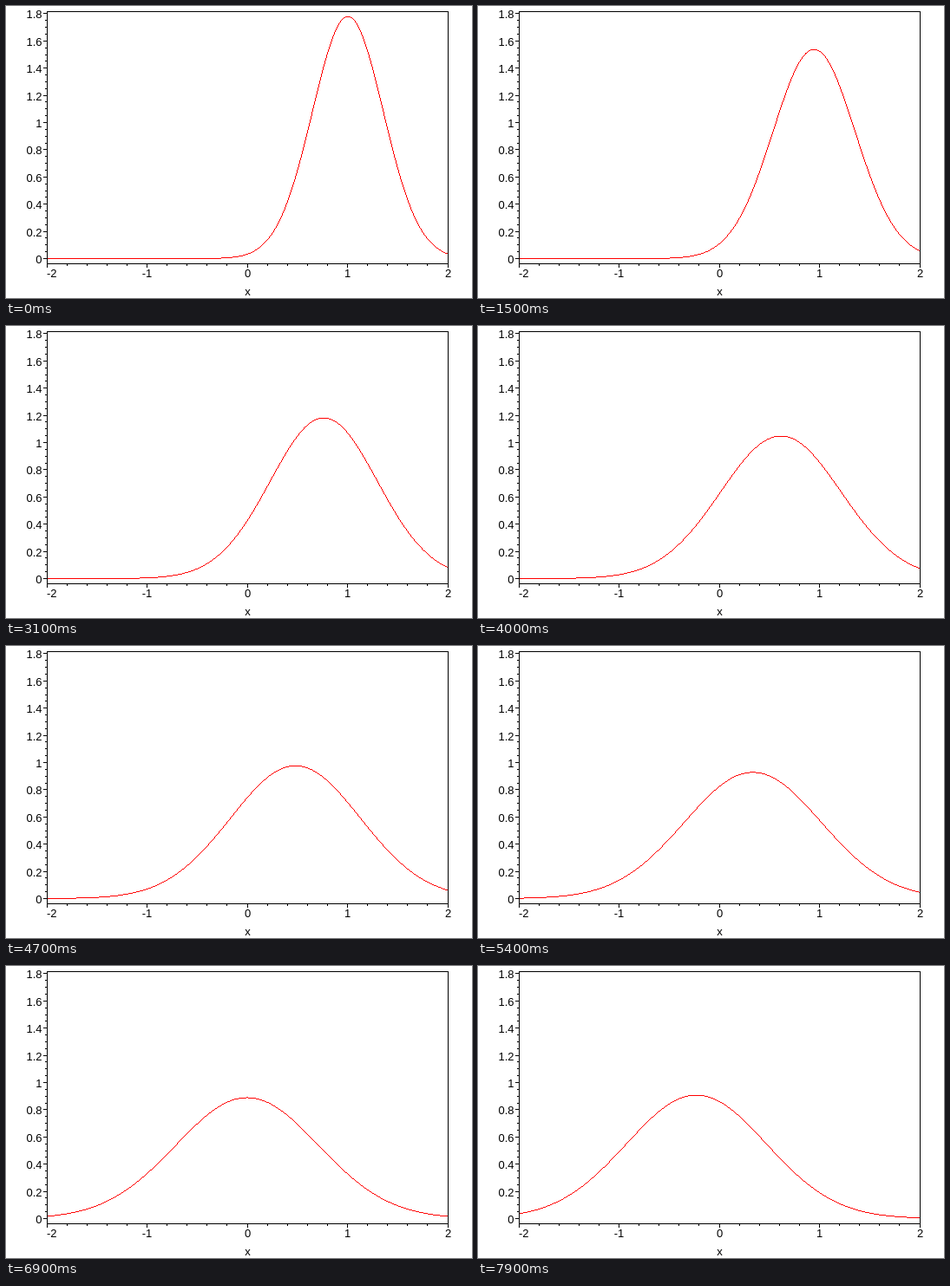
An HTML page that plays this animation: 537 by 337 pixels, repeating every 8 s.

```html
<!DOCTYPE html>
<html lang="en">
<head>
<meta charset="utf-8">
<title>Oscillating wave packet</title>
<style>
  html, body { margin: 0; width: 100%; height: 100%; overflow: hidden; background: #fff; }
  svg { display: block; }
  path { shape-rendering: crispEdges; }
  text { font: 13px "Liberation Sans", Arial, sans-serif; fill: #000; }
</style>
</head>
<body>
<svg id="plot" width="537" height="337" viewBox="0 0 537 337">
  <path id="axes" fill="#000"/>
  <path id="curve" fill="#f00"/>
</svg>
<script>
const LOOP = 8000, STEP = 100, STEPS_PER_PERIOD = 275;
const LEFT = 47, RIGHT = 509, TOP = 6, BOTTOM = 297;
const ZERO_X = 278, UNIT_X = 115.5, ZERO_Y = 291, UNIT_Y = 157, PEAK = 279;

const plot = document.getElementById('plot');
const curve = document.getElementById('curve');
const box = (x, y, w, h) => `M${x} ${y}h${w}v${h}h${-w}z`;

function label(str, x, y, anchor) {
  const el = document.createElementNS('http://www.w3.org/2000/svg', 'text');
  el.textContent = str;
  el.setAttribute('x', x);
  el.setAttribute('y', y);
  el.setAttribute('text-anchor', anchor);
  plot.append(el);
}

function drawAxes() {
  const width = RIGHT - LEFT + 1, height = BOTTOM - TOP + 1;
  let d = box(LEFT, TOP, width, 1) + box(LEFT, BOTTOM, width, 1)
        + box(LEFT, TOP, 1, height) + box(RIGHT, TOP, 1, height);

  for (let i = -10; i <= 10; i++) {
    const x = Math.floor(ZERO_X + i / 5 * UNIT_X), major = i % 5 === 0;
    d += box(x, BOTTOM, 1, major ? 5 : 3);
    if (!major) continue;
    if (i === -10) label('-2', LEFT, 313, 'start');
    else label(String(i / 5), x + 0.5, 313, 'middle');
  }

  for (let i = 0; i <= 36; i++) {
    const y = Math.round(ZERO_Y - i / 20 * UNIT_Y), major = i % 4 === 0;
    const size = major ? 4 : 2;
    d += box(LEFT - size, y, size, 1);
    if (major) label(String(i / 20), 41.5, y + 5.5, 'end');
  }

  label('x', ZERO_X + 0.5, 334, 'middle');
  document.getElementById('axes').setAttribute('d', d);
}

// Gaussian whose centre swings as a cosine while its width breathes.
function drawCurve(step) {
  const angle = 2 * Math.PI * step / STEPS_PER_PERIOD;
  const centre = Math.cos(angle);
  const spread = Math.hypot(centre, 2 * Math.sin(angle));
  const rowAt = px => {
    const u = 2 * ((px - ZERO_X) / UNIT_X - centre) / spread;
    return Math.round(ZERO_Y - PEAK / spread * Math.exp(-u * u));
  };
  let d = '';
  for (let x = LEFT + 1; x < RIGHT; x++) {
    const a = rowAt(x - 0.5), b = rowAt(x + 0.5);
    d += box(x, Math.min(a, b), 1, Math.max(1, Math.abs(a - b)));
  }
  curve.setAttribute('d', d);
}

function frame() {
  drawCurve(Math.floor(performance.now() % LOOP / STEP));
  requestAnimationFrame(frame);
}

drawAxes();
frame();
</script>
</body>
</html>
```
